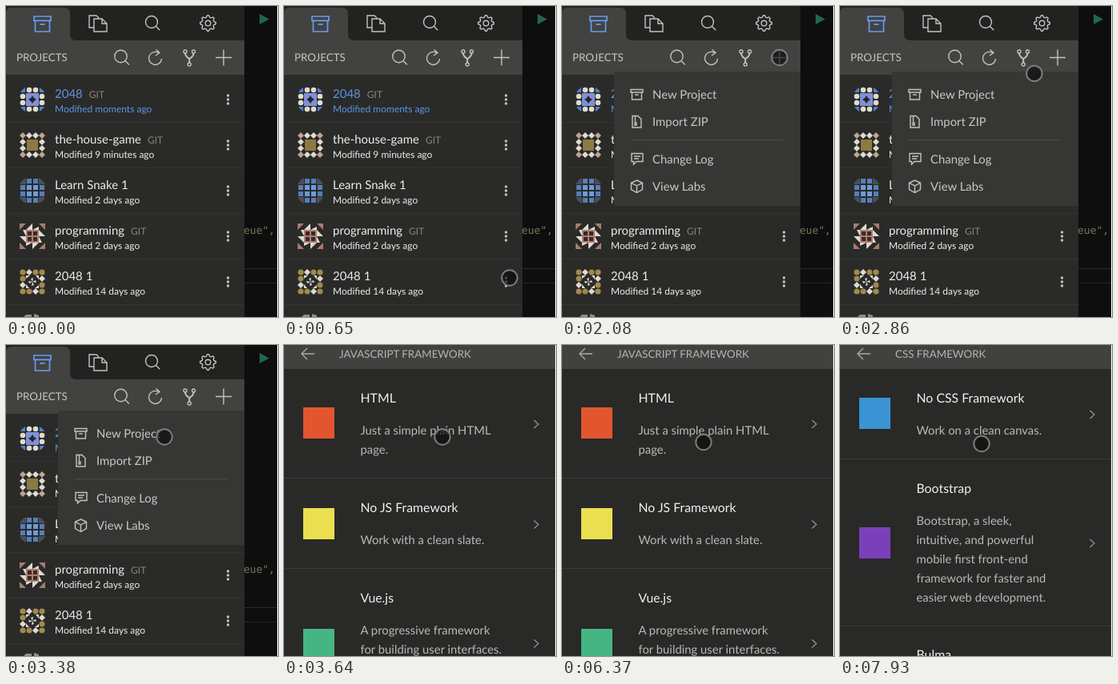
An HTML page for the animation above (8000 ms loop, 340 px wide and 389 px high).

```html
<!DOCTYPE html>
<html lang="en">
<head>
<meta charset="utf-8">
<title>Project picker</title>
<style>
html, body { margin: 0; width: 100%; height: 100%; overflow: hidden; background: #fff; }
svg { display: block; font-family: Lato, "Open Sans", sans-serif; text-rendering: geometricPrecision; }
.line { fill: none; stroke: #c2c2c0; stroke-width: 1.4; }
.blue .line { stroke: #679cf0; stroke-width: 1.7; }
.dim .line { stroke: #969694; stroke-width: 1.2; }
</style>
</head>
<body>
<svg id="stage" width="340" height="389" viewBox="0 0 340 389"></svg>
<script>
const LOOP = 8000, STEP = 130;

const text = (x, y, s, size, fill = '#ececea') =>
  `<text x="${x}" y="${y}" font-size="${size}" fill="${fill}">${s}</text>`;
const rect = (x, y, w, h, fill) =>
  `<rect x="${x}" y="${y}" width="${w}" height="${h}" fill="${fill}"/>`;
const circle = (x, y, r, fill) => `<circle cx="${x}" cy="${y}" r="${r}" fill="${fill}"/>`;
const shape = (d, fill) => `<path d="${d}" fill="${fill}"/>`;
const line = (d, extra = '') => `<path class="line" d="${d}" ${extra}/>`;
const ring = (x, y, r) => `<circle class="line" cx="${x}" cy="${y}" r="${r}"/>`;
const group = (name, s) => `<g class="${name}">${s}</g>`;
const diamond = (x, y, r, fill) => shape(`M${x} ${y - r}l${r} ${r}l${-r} ${r}l${-r} ${-r}z`, fill);
const quarters = s => [0, 90, 180, 270].map(a => `<g transform="rotate(${a})">${s}</g>`).join('');

const search = (x, y, r) => ring(x, y, r) + line(`M${x + r * .7} ${y + r * .7}l5 5`);
const archive = (x, y, w, h) =>
  line(`M${x} ${y}h${w}v${h * .28}h${-w}zM${x + 1.5} ${y + h * .28}v${h * .72}h${w - 3}v${-h * .72}M${x + w * .35} ${y + h * .52}h${w * .3}`);

function gear(x, y) {
  const points = [];
  for (let i = 0; i < 32; i++) {
    const a = (i - .5) * Math.PI / 16, r = i % 4 < 2 ? 9.8 : 7.6;
    points.push((x + r * Math.cos(a)).toFixed(1) + ' ' + (y + r * Math.sin(a)).toFixed(1));
  }
  return line(`M${points.join('L')}z`, 'stroke-linejoin="round"') + ring(x, y, 3.3);
}

// One quarter of each avatar; the rest follows by rotation.
const pale = '#dedbd0';
const avatars = [
  shape('M-9 -9v-6A16 16 0 0 0 -15 -9z', '#4f82cc') +
    circle(-4, -12, 3.3, pale) + circle(4, -12, 3.3, pale) +
    rect(-8, -8, 8, 8, '#7f90d8') + shape('M0 0v-5l-2 3l-3 2z', '#25262c'),
  diamond(-12, -12, 4, '#c3a28e') + diamond(-4, -12, 4, pale) + diamond(4, -12, 4, pale) +
    rect(-7, -7, 7, 7, '#8c7a43'),
  shape('M-8 -8v-8A16 16 0 0 0 -16 -8z', '#4b4f55') +
    rect(-7, -15, 6, 6, '#557fb8') + rect(1, -15, 6, 6, '#557fb8') +
    rect(-7, -7, 6, 6, '#6c9bd8'),
  shape('M-16 -16h8l-8 8z', '#a97a6c') + shape('M-8 -8l8 -8v8zM0 -8l8 -4v4z', pale) +
    rect(-8, -8, 8, 8, '#b07d70') + rect(-6, -6, 5, 5, '#342c2a'),
  circle(-12, -12, 3.6, '#a08a4c') + diamond(-4, -12, 4, pale) + circle(4, -12, 3.5, '#a08a4c') +
    shape('M-8 -8h5l-5 4zM0 0l-2 -4l3 -1z', pale)
];

const projects = [
  ['2048', 'moments ago', true],
  ['the-house-game', '9 minutes ago', true],
  ['Learn Snake 1', '2 days ago', false],
  ['programming', '2 days ago', true],
  ['2048 1', '14 days ago', false]
];

function projectRow([name, age, git], i) {
  const y = 117 + 57 * i, fill = i ? '#ececea' : '#5b95e2';
  const tag = git ? `<tspan dx="8" dy="-.5" font-size="12" fill="#858583">GIT</tspan>` : '';
  return `<g transform="translate(33 ${y})">${quarters(avatars[i])}</g>` +
    text(61, y - 2, name + tag, 15, fill) + text(61, y + 16, 'Modified ' + age, 12, fill) +
    [-5, 0, 5].map(d => circle(277.5, y + d, 1.7, '#c4c4c2')).join('') +
    rect(0, y + 28, 298, 1, '#343432');
}

const editor = rect(0, 0, 339, 389, '#0e0e0e') +
  shape('M317 10l12 6.5l-12 6.5z', '#20674a') +
  `<text x="297" y="285" font-size="13" fill="#77775c" font-family="'DejaVu Sans Mono', monospace">eue",</text>` +
  rect(298, 328, 41, 1, '#2b2b2b') + rect(298, 346, 41, 1, '#242424');

const panel = rect(0, 0, 298, 389, '#2a2a29') + rect(0, 0, 298, 43, '#222221') +
  shape('M0 43V9Q0 2 7 2H72Q80 2 80 10V35Q80 43 88 43z', '#424241') +
  rect(0, 43, 298, 43, '#424241') +
  group('blue', archive(35, 13, 21, 19)) +
  line('M110 27h-6v-15h9l3 3M110 16h10l6 6v10h-16zM120 16v6h6') +
  search(182, 20, 7.5) + gear(252.5, 21.5) +
  text(13, 69, 'PROJECTS', 13.4, '#c6c6c4') +
  search(143.5, 63, 7.7) +
  line('M194.5 66a8 8 0 1 1 -4 -7.5M187.5 54.5l4.5 4l-5 3.5') +
  ring(224, 57, 2) + ring(234.5, 57, 2) + ring(229.2, 73, 2) +
  line('M224 59q0 4 5.2 7q5.3 -3 5.3 -7M229.2 66v5', 'style="stroke-width:2"') +
  line('M262 64.5h20M272 54.5v20') +
  projects.map(projectRow).join('') +
  shape('M22 389l3 -3h7v3zM35 389v-4l6 2v2z', '#8f8f8a');

const menu = rect(65, 82, 233, 168, '#363635') +
  archive(86, 104.5, 15, 12.5) +
  line('M88 137.5h7l4 4v10.5h-11zM91.5 138v7M91 146h2v3h-2z') +
  line('M87 184.5h14v10h-8l-3.5 3.5v-3.5h-2.5zM90 188h8M90 191h6') +
  line('M93.5 218l7 3.3v8.4l-7 3.8l-7 -3.8v-8.4zM86.5 221.3l7 3.5l7 -3.5M93.5 224.8v8.5') +
  rect(86, 167, 191, 1, '#4d4d4b') +
  ['New Project', 'Import ZIP', 'Change Log', 'View Labs']
    .map((s, i) => text(113, [115.5, 149.5, 196.5, 230.5][i], s, 14.9, '#c8c8c6')).join('');

// Each entry: title baseline, title, description lines, icon colour, icon top, arrow centre.
function picker(title, entries, rules) {
  return rect(0, 0, 339, 389, '#292928') + rect(0, 0, 339, 30, '#414140') +
    line('M38 11h-16M29 4l-7 7l7 7', 'style="stroke:#a9a9a7"') +
    text(69, 15.5, title, 13.35, '#b4b4b2') +
    rules.map(y => rect(0, y, 339, 1, '#3b3b39')).join('') +
    entries.map(([y, name, lines, fill, top, mid]) =>
      text(95.5, y, name, 15.85, '#f0f0ee') +
      lines.map((s, i) => text(95.5, y + 40 + 24 * i, s, 14.85, '#b9b9b7')).join('') +
      (fill ? rect(24, top, 39, 39, fill) + group('dim', line(`M312.5 ${mid - 5}l5.5 5l-5.5 5`)) : '')).join('');
}

const scripts = picker('JAVASCRIPT FRAMEWORK', [
  [72, 'HTML', ['Just a simple plain HTML', 'page.'], '#e2552f', 78, 99],
  [209, 'No JS Framework', ['Work with a clean slate.'], '#ebdf50', 204, 224.5],
  [322, 'Vue.js', ['A progressive framework', 'for building user interfaces.'], '#45b583', 355, 373.5]
], [166, 279]);

const styles = picker('CSS FRAMEWORK', [
  [72, 'No CSS Framework', ['Work on a clean canvas.'], '#3a94d3', 66, 87],
  [185, 'Bootstrap', ['Bootstrap, a sleek,', 'intuitive, and powerful', 'mobile first front-end',
    'framework for faster and', 'easier web development.'], '#7b40b9', 228, 248],
  [393, 'Bulma', []]
], [142, 351]);

const stage = document.getElementById('stage');
stage.innerHTML =
  `<g id="home">${editor}${panel}<g id="menu">${menu}</g></g>` +
  `<g id="scripts">${scripts}</g><g id="styles">${styles}</g>` +
  '<circle id="pointer" r="9.7" fill="#0c0c0c" fill-opacity=".68" stroke="#7c7c7a" stroke-width="2"/>' +
  rect(339, 0, 1, 389, '#fff');
const part = id => document.getElementById(id);
const show = (id, on) => part(id).style.display = on ? '' : 'none';

// Pointer stops: time, x, y
const stops = [
  [260, 338, 400], [650, 282, 340], [1560, 272, 64.5], [2470, 272, 64.5], [3380, 198, 115],
  [4680, 198, 115], [5070, 198, 153.5], [5590, 194, 178], [6370, 177, 121.5],
  [7800, 177, 121.5], [7930, 177, 123.5], [LOOP, 177, 123.5]
];

function pointerAt(t) {
  const i = Math.max(1, stops.findIndex(s => s[0] >= t));
  const [t0, x0, y0] = stops[i - 1], [t1, x1, y1] = stops[i];
  const u = Math.min(1, Math.max(0, (t - t0) / (t1 - t0)));
  const k = u * u * (3 - 2 * u);
  return [x0 + (x1 - x0) * k, y0 + (y1 - y0) * k];
}

function draw(now) {
  const t = Math.floor(now % LOOP / STEP) * STEP;
  show('home', t < 3640);
  show('scripts', t >= 3640 && t < 7150);
  show('styles', t >= 7150);
  show('menu', t >= 1820);
  part('menu').style.opacity = Math.min(1, (t - 1690) / 390);
  show('pointer', t >= 390);
  const [x, y] = pointerAt(t);
  part('pointer').setAttribute('transform', `translate(${x} ${y})`);
}

const start = performance.now();
function tick() {
  draw(performance.now() - start);
  requestAnimationFrame(tick);
}
tick();
</script>
</body>
</html>
```
